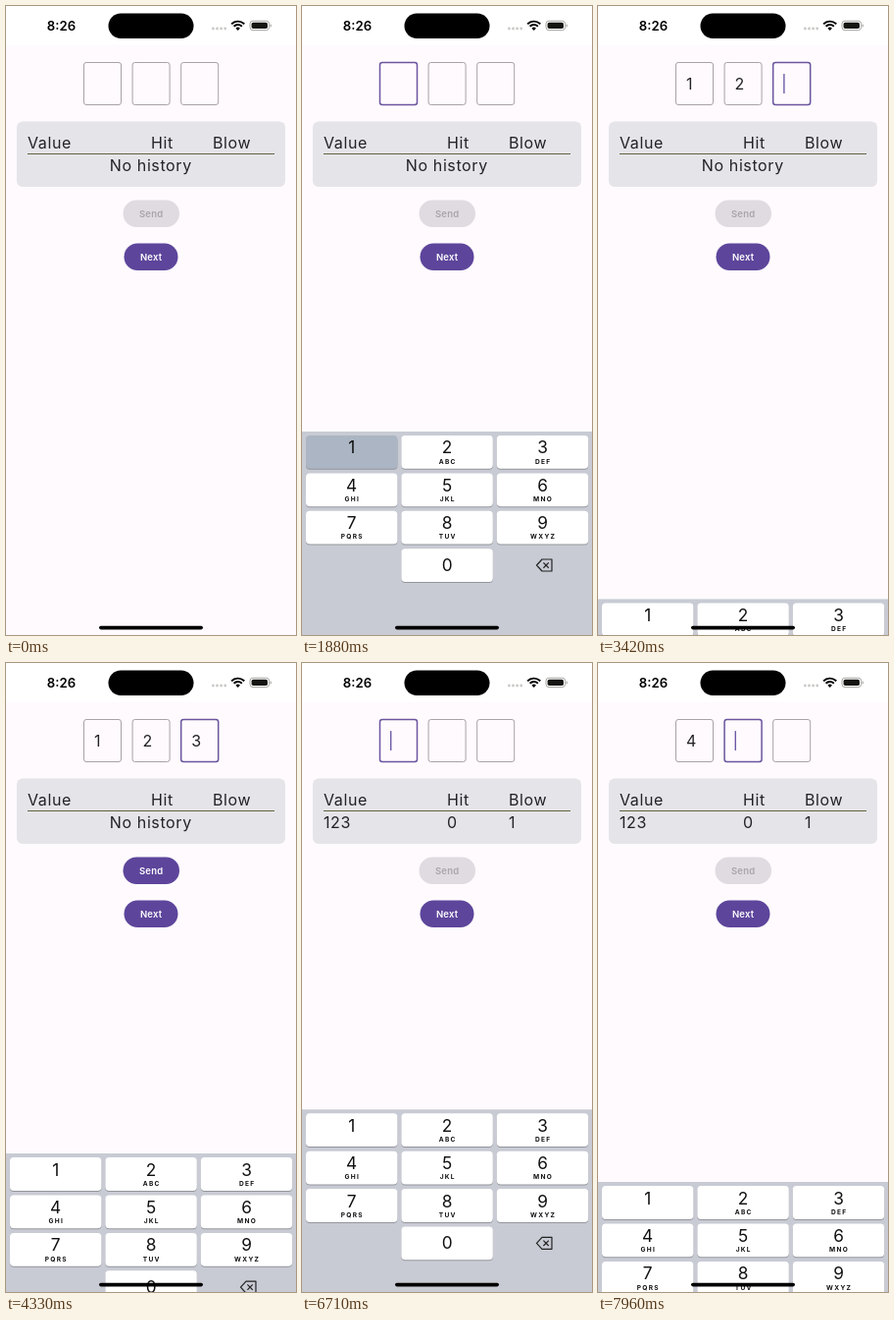
An HTML page with a canvas for the animation above (8000 ms loop, 296 px wide and 640 px high).

```html
<!DOCTYPE html>
<html lang="en">
<head>
<meta charset="utf-8">
<style>
  html, body { margin: 0; width: 100%; height: 100%; overflow: hidden; background: #fefafd; }
  canvas { display: block; width: 296px; height: 640px; }
</style>
</head>
<body>
<canvas id="stage"></canvas>
<script>
const W = 296, H = 640, LOOP = 8000;
const canvas = document.getElementById('stage');
const c = canvas.getContext('2d');
const dpr = window.devicePixelRatio || 1;
canvas.width = W * dpr;
canvas.height = H * dpr;
c.scale(dpr, dpr);

const INK = '#232226', PURPLE = '#5d459b';
const KB_TOP = 433, KB_HEIGHT = 207, STIFF = 18.26;

// [time, 1 = slide in / 0 = slide out]
const slides = [[1047, 1], [2030, 0], [2370, 1], [3248, 0], [3585, 1],
                [4268, 0], [6500, 1], [7520, 0], [7863, 1]];
// [from, to, key]
const presses = [[1860, 2000, '1'], [3080, 3220, '2'], [4100, 4240, '3'], [7340, 7490, '4']];
// [time, typed digits, focused box]
const states = [[0, '', -1], [1010, '', 0], [2020, '1', 1], [3235, '12', 2],
                [4250, '123', 2], [4380, '123', -1], [5120, '', -1],
                [6400, '', 0], [7510, '4', 1]];
const letters = ['', 'ABC', 'DEF', 'GHI', 'JKL', 'MNO', 'PQRS', 'TUV', 'WXYZ'];

function box(x, y, w, h, r, fill, stroke, line = 1) {
  c.beginPath();
  c.roundRect(x, y, w, h, r);
  if (fill) { c.fillStyle = fill; c.fill(); }
  if (stroke) { c.strokeStyle = stroke; c.lineWidth = line; c.stroke(); }
}

function text(s, x, y, size, { weight = 400, color = INK, align = 'left', gap = 0 } = {}) {
  c.font = `${weight} ${size}px Inter, "Liberation Sans", sans-serif`;
  c.letterSpacing = gap + 'px';
  c.textAlign = align;
  c.fillStyle = color;
  c.fillText(s, x + (align === 'center' ? gap / 2 : 0), y);
}

function path(points, close) {
  c.beginPath();
  points.forEach(([x, y]) => c.lineTo(x, y));
  if (close) c.closePath();
  c.stroke();
}

// Critically damped spring, retargeted at every slide
function keyboardOffset(t) {
  let hidden = 1;
  slides.forEach(([start, shown], i) => {
    if (t < start) return;
    const end = i + 1 < slides.length ? slides[i + 1][0] : Infinity;
    const u = STIFF * (Math.min(t, end) - start) / 1000;
    const target = 1 - shown;
    hidden = target + (hidden - target) * (1 + u) * Math.exp(-u);
  });
  return hidden * KB_HEIGHT;
}

function statusBar() {
  box(0, 0, W, 40, 0, '#fff');
  text('8:26', 41.8, 24.6, 13.2, { weight: 600, color: '#000' });
  box(104.5, 7.5, 87, 25.5, 12.75, '#000');
  for (let i = 0; i < 4; i++) box(210 + i * 4.1, 21.6, 2.8, 2.8, 1.4, '#c9c9c6');

  c.strokeStyle = '#000';
  c.lineWidth = 1.9;
  for (const r of [9, 5.6]) {
    c.beginPath();
    c.arc(236.7, 24.6, r, -Math.PI * 0.76, -Math.PI * 0.24);
    c.stroke();
  }
  c.fillStyle = '#000';
  c.beginPath();
  c.moveTo(236.7, 25);
  c.arc(236.7, 24.8, 3, -Math.PI * 0.76, -Math.PI * 0.24);
  c.fill();

  box(249, 15.2, 19.6, 9.4, 3, null, '#a5a5a0');
  box(250.6, 16.8, 16.4, 6.2, 1.8, '#151512');
  box(269.6, 18.4, 1.2, 3, 0.6, '#a5a5a0');
}

function inputs(digits, focus, cursor) {
  for (let i = 0; i < 3; i++) {
    const x = 79 + i * 49.6, on = i === focus;
    box(x + 0.5, 57.5, 38, 43, 2.5, null, on ? '#6b559f' : '#a9a2a8', on ? 1.5 : 1);
    if (digits[i]) text(digits[i], x + 11, 84.8, 16);
    else if (on && cursor) box(x + 11, 69, 1.4, 20, 0.5, '#6f5aa6');
  }
}

function history(sent) {
  box(11, 117.5, 274, 66.5, 6, '#e5e4e9');
  const row = (cells, y) => cells.forEach((s, i) => text(s, [22, 148, 211][i], y, 16, { gap: 0.6 }));
  row(['Value', 'Hit', 'Blow'], 145.3);
  box(22, 150, 252, 1, 0, '#62643f');
  if (sent) row(['123', '0', '1'], 168);
  else text('No history', 147.5, 168, 16, { align: 'center', gap: 0.6 });
}

function button(label, x, y, w, fill, color) {
  box(x, y, w, 27.5, 13.75, fill);
  text(label, 148, y + 17.3, 9.5, { weight: 600, color, align: 'center', gap: 0.2 });
}

function keyboard(top, pressed) {
  box(0, top, W, H - top + 1, 0, '#c8cbd4');
  for (let i = 0; i < 10; i++) {
    const digit = i < 9 ? String(i + 1) : '0';
    const col = i < 9 ? i % 3 : 1, r = Math.floor(i / 3);
    const x = 4 + col * 97.4, y = top + 4 + r * 38.4, mid = x + 46.7;
    box(x, y + 1, 93.4, 33.8, 4, '#94969c');
    box(x, y, 93.4, 33.8, 4, digit === pressed ? '#abb5c3' : '#fff');
    text(digit, mid, y + (i < 9 ? 18.4 : 22.6), 17.3, { align: 'center', color: '#111' });
    if (letters[i]) text(letters[i], mid, y + 28.6, 6.6, { weight: 700, align: 'center', gap: 1.3, color: '#111' });
  }
  const y = top + 136;
  c.strokeStyle = '#222';
  c.lineWidth = 1.2;
  c.lineJoin = 'round';
  path([[239.5, y], [245, y - 6], [255, y - 6], [255, y + 6], [245, y + 6]], true);
  path([[246.4, y - 2.7], [251.8, y + 2.7]]);
  path([[251.8, y - 2.7], [246.4, y + 2.7]]);
}

function draw(t) {
  const [since, digits, focus] = states.filter(s => s[0] <= t).pop();
  const cursor = (t - since) % 1000 < 500;
  const press = presses.find(p => t >= p[0] && t < p[1]);

  box(0, 0, W, H, 0, '#fefafd');
  statusBar();
  inputs(digits, focus, cursor);
  history(t >= 5120);

  if (digits.length === 3) {
    button('Send', 119.5, 197.5, 57.5, t >= 4960 ? '#6f59a8' : PURPLE, '#fff');
  } else {
    button('Send', 119.5, 197.5, 57.5, '#dfdbe1', '#a9a5ab');
  }
  button('Next', 120.5, 241.5, 55, PURPLE, '#fff');

  const offset = keyboardOffset(t);
  if (offset < KB_HEIGHT - 0.5) keyboard(KB_TOP + offset, press && press[2]);
  box(95, 630.8, 106, 3.6, 1.8, '#000');
}

function frame(now) {
  draw(now % LOOP);
  requestAnimationFrame(frame);
}
draw(0);
requestAnimationFrame(frame);
</script>
</body>
</html>
```
